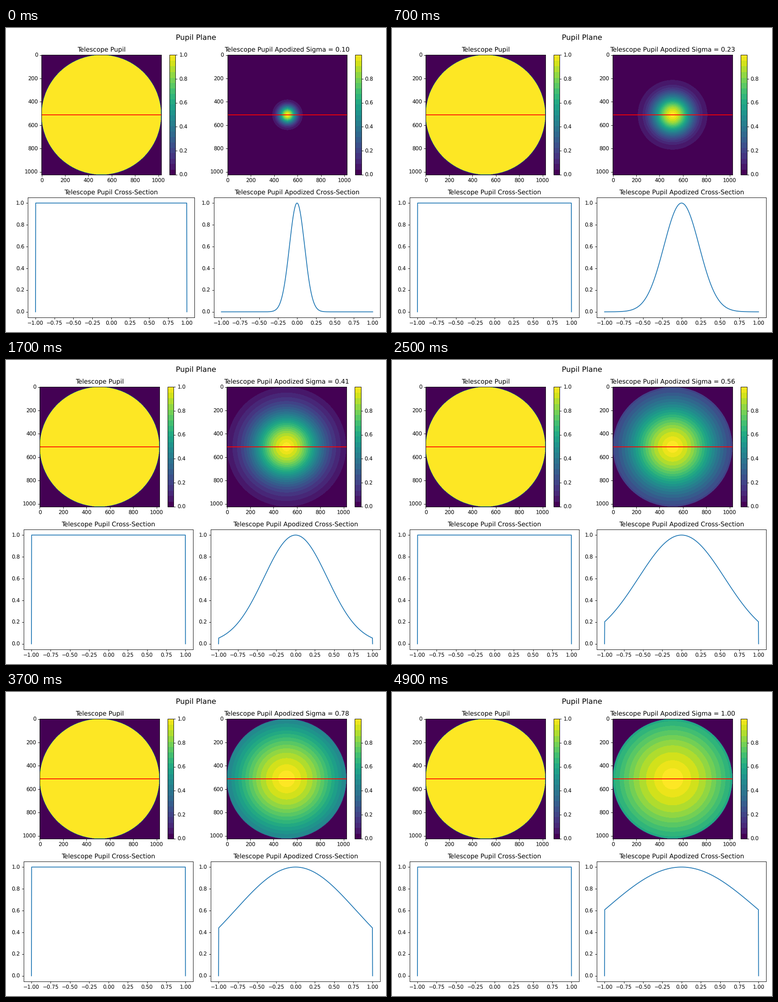
Write a matplotlib script that moves like this. It is 837 px wide and 669 px high and loops after 5000 ms.

```python
import matplotlib.pyplot as plt
import numpy as np
from matplotlib.animation import FuncAnimation
from matplotlib.colors import ListedColormap

WIDTH, HEIGHT, DPI = 837, 669, 83.7
FRAMES, INTERVAL = 50, 100
SAMPLES, GRID = 1024, 512
TOP, BOTTOM, RIGHT, ROW = 59.4, 636.6, 824.4, 263.3

plt.rcParams.update({"font.family": "DejaVu Sans", "font.size": 10,
                     "text.hinting": "no_hinting"})


def banded_viridis():
    """Viridis reduced to a couple of dozen flat steps."""
    edges = np.concatenate([[0, 0.038], np.linspace(0.087, 0.857, 18),
                            [0.907, 0.955, 0.988, 1]])
    centres = (edges[:-1] + edges[1:]) / 2
    centres[0], centres[-1] = 0, 1
    band = np.searchsorted(edges[1:-1], np.linspace(0, 1, 256), side="right")
    return ListedColormap(plt.get_cmap("viridis")(centres[band]))


def set_columns(left, column):
    """Place two columns of the given pixel width between left and RIGHT."""
    fig.subplots_adjust(
        left=left / WIDTH, right=RIGHT / WIDTH,
        bottom=1 - BOTTOM / HEIGHT, top=1 - TOP / HEIGHT,
        wspace=(RIGHT - left - 2 * column) / column,
        hspace=(BOTTOM - TOP - 2 * ROW) / ROW)


def show_pupil(ax, data, title, ticks):
    extent = (-0.5, SAMPLES - 0.5, SAMPLES - 0.5, -0.5)
    image = ax.imshow(data, cmap=CMAP, extent=extent, vmin=0, vmax=data.max())
    ax.axhline(SAMPLES // 2, color="red", lw=1.5, snap=False)
    ax.set_xticks(range(0, 1001, 200))
    ax.set_yticks(range(0, 1001, 200))
    ax.set_title(title)
    fig.colorbar(image, ax=ax, ticks=ticks)
    return image


def show_section(ax, values, title):
    line, = ax.plot(x, values, color="C0", lw=1.5)
    ax.set(xlim=(-1.1, 1.1), ylim=(-0.05, 1.05), title=title)
    ax.set_xticks(np.linspace(-1, 1, 9))
    ax.set_yticks(np.linspace(0, 1, 6))
    return line


def gaussian(r, sigma):
    return np.exp(-r**2 / (2 * sigma**2))


def apodized(sigma):
    profile = gaussian(axis, sigma)
    return pupil * np.outer(profile, profile)


CMAP = banded_viridis()
SIGMAS = np.linspace(0.1, 1.0, FRAMES)

x = np.linspace(-1, 1, SAMPLES)
section = (np.abs(x) < 1).astype(float)
axis = np.linspace(-1, 1, GRID)
pupil = (np.hypot(axis[:, None], axis) < 1).astype(float)

# The tiny margin keeps the pixel size from rounding down.
fig, axes = plt.subplots(
    2, 2, figsize=((WIDTH + 0.001) / DPI, (HEIGHT + 0.001) / DPI), dpi=DPI)
fig.suptitle("Pupil Plane", fontsize=14)

ticks = np.linspace(0, 1, 6)
show_pupil(axes[0, 0], pupil, "Telescope Pupil", ticks)
apodized_image = show_pupil(axes[0, 1], apodized(SIGMAS[0]), "", ticks[:-1])
show_section(axes[1, 0], section, "Telescope Pupil Cross-Section")
apodized_line = show_section(axes[1, 1], section,
                             "Telescope Pupil Apodized Cross-Section")


def update(frame):
    sigma = SIGMAS[frame]
    # The layout settles into its final width after the opening frame.
    if frame == 0:
        set_columns(48.4, 366.7)
    else:
        set_columns(39.1, 373.2)
    data = apodized(sigma)
    apodized_image.set_data(data)
    apodized_image.set_clim(0, data.max())
    apodized_line.set_ydata(section * gaussian(x, sigma))
    axes[0, 1].set_title(f"Telescope Pupil Apodized Sigma = {sigma:.2f}")
    return apodized_image, apodized_line


animation = FuncAnimation(fig, update, frames=FRAMES, interval=INTERVAL,
                          init_func=lambda: update(0), repeat=True,
                          repeat_delay=0, blit=False)
plt.show()
```
